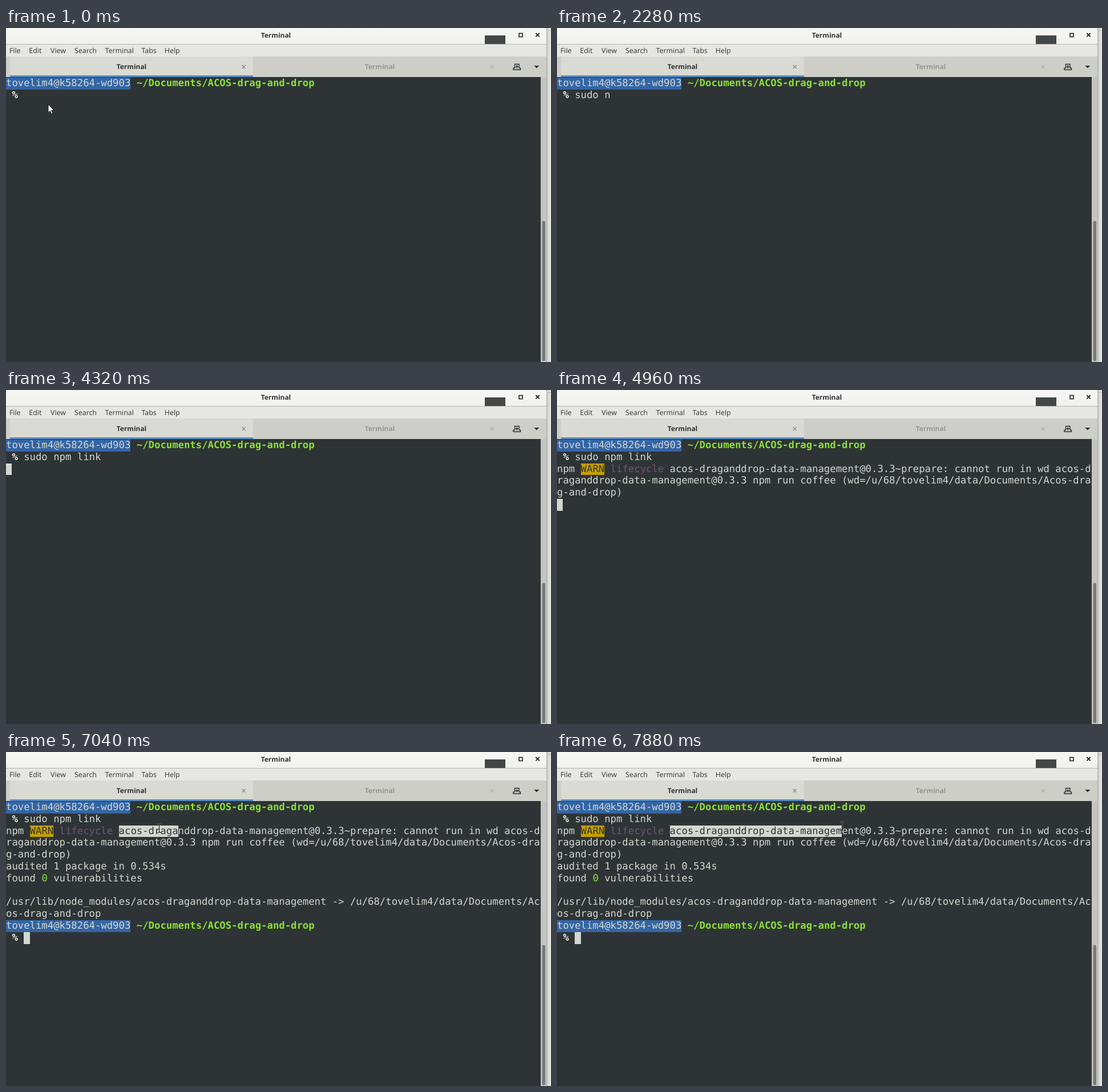
An HTML page for the animation above (8 s loop, 955x586 px).

```html
<!DOCTYPE html>
<html lang="en">
<head>
<meta charset="utf-8">
<title>Terminal</title>
<style>
  html, body { margin: 0; width: 100%; height: 100%; overflow: hidden; background: #e9e9e6; }
  #stage { position: relative; width: 955px; height: 586px; overflow: hidden; text-rendering: geometricPrecision; }
  svg { position: absolute; left: 0; top: 0; }
  svg text { font: 12.4px "Open Sans", "Noto Sans", sans-serif; fill: #2f3331; }
  svg .bold { font-weight: 700; font-size: 11.9px; text-anchor: middle; }
  #term { position: absolute; left: 0; top: 87px; font: 17.274px/21px "DejaVu Sans Mono", monospace; }
  #term span { position: absolute; height: 20.8px; white-space: pre; }
</style>
</head>
<body>
<div id="stage">
  <svg width="955" height="586">
    <defs>
      <linearGradient id="bar" x2="0" y2="1">
        <stop offset="0" stop-color="#f6f6f3"/>
        <stop offset="1" stop-color="#f1f1ec"/>
      </linearGradient>
      <linearGradient id="shade">
        <stop offset="0" stop-color="#c9c9c6"/>
        <stop offset="1" stop-color="#e9e9e6"/>
      </linearGradient>
    </defs>
    <!-- desktop edge and window -->
    <rect x="947" width="8" height="586" fill="url(#shade)"/>
    <rect x="949" y="4" width="6" height="1" fill="#b9b9b5"/>
    <rect x="947" width="1" height="586" fill="#a5a6a2"/>
    <rect width="947" height="28" fill="url(#bar)"/>
    <rect y="28" width="947" height="1" fill="#b5b6af"/>
    <rect y="29" width="947" height="21" fill="#e6e7e2"/>
    <rect y="50" width="947" height="36" fill="#cdcec8"/>
    <rect x="7" y="50" width="426" height="36" fill="#d9dad4"/>
    <rect x="7" y="83.2" width="426" height="2.6" fill="#4a86cb"/>
    <rect y="86" width="937" height="500" fill="#2e3436"/>
    <rect x="937" y="86" width="10" height="500" fill="#c3c5c2"/>
    <rect x="939.5" y="338.5" width="5.5" height="246" rx="2.7" fill="#777a79"/>
    <!-- title bar -->
    <text class="bold" x="473" y="17.3">Terminal</text>
    <rect x="839" y="13" width="36" height="15" fill="#434745"/>
    <rect x="899" y="9.5" width="6" height="6" fill="none" stroke="#2b2f2d" stroke-width="1.7"/>
    <path d="M928.3 9l6.4 6.4m0-6.4l-6.4 6.4" stroke="#2b2f2d" stroke-width="2"/>
    <!-- menu -->
    <text x="5.9" y="44.3">File</text>
    <text x="40.3" y="44.3">Edit</text>
    <text x="78" y="44.3">View</text>
    <text x="120" y="44.3">Search</text>
    <text x="173.5" y="44.3">Terminal</text>
    <text x="237.5" y="44.3">Tabs</text>
    <text x="277.8" y="44.3">Help</text>
    <!-- tabs -->
    <text class="bold" x="220" y="72.2">Terminal</text>
    <text class="bold" x="655" y="72.2" style="fill:#969792">Terminal</text>
    <path d="M413.7 65l6 6m0-6l-6 6" stroke="#8c8e89" stroke-width="1.5"/>
    <path d="M849 65l6 6m0-6l-6 6" stroke="#b3b4ae" stroke-width="1.5"/>
    <path d="M891.5 70.5V63.5h7.5v7M889 73.3h12.5v-3h-2.5M889 73.8v-3.5h2.5M895.3 65.3v5.4M892.6 68h5.4"
      fill="none" stroke="#2b2f2d" stroke-width="1.4"/>
    <path d="M925.3 66h9l-4.5 4.5z" fill="#2b2f2d"/>
  </svg>
  <div id="term"></div>
  <svg width="955" height="586">
    <path id="arrow" d="M0 0V14.5L3.4 11.4 5.8 16.8 8 15.8 5.7 10.5H10Z" fill="#fff" stroke="#111" stroke-width=".9"/>
    <g id="beam" fill="none">
      <path id="outline" stroke="#fff" stroke-opacity=".5" stroke-width="2.1"
        d="M-3.5-7.7Q-.6-7.7 0-6.3Q.6-7.7 3.5-7.7M0-6.3V6.3M-3.5 7.7Q-.6 7.7 0 6.3Q.6 7.7 3.5 7.7"/>
    </g>
  </svg>
</div>
<script>
const LOOP = 8000, CELL = 10.4, LINE = 20.8;
const BG = '#2e3436', FG = '#d3d7cf', GREEN = '#8ae234';
const USER = 'tovelim4', HOST = 'k58264-wd903';
const $ = id => document.getElementById(id);
const term = $('term');

// A run is [text, colour, background, bold].
const prompt = [[`${USER}@${HOST}`, FG, '#3465a4'], [' '], ['~/Documents/ACOS-drag-and-drop', GREEN, '', true]];
const percent = [[' % ', '#eeeeec', '', true]];
const home = `/u/68/${USER}/data/Documents/`;
const PKG = 'acos-draganddrop-data-management';

// Time, row, runs
const output = [
  [0, 0, prompt],
  [0, 1, percent],
  [4920, 2, [['npm '], ['WARN', BG, '#c4a000'], [' '], ['lifecycle', '#75507b'],
    [` ${PKG}@0.3.3~prepare: cannot run in wd acos-d`]]],
  [4920, 3, [[`raganddrop-data-management@0.3.3 npm run coffee (wd=${home}Acos-dra`]]],
  [4920, 4, [['g-and-drop)']]],
  [5360, 5, [['audited 1 package in 0.534s']]],
  [5360, 6, [['found '], ['0', GREEN], [' vulnerabilities']]],
  [5440, 8, [[`/usr/lib/node_modules/${PKG} -> ${home}Ac`]]],
  [5440, 9, [['os-drag-and-drop']]],
  [5520, 10, prompt],
  [5520, 11, percent]
];

const command = 'sudo npm link';
const keyTimes = [520, 680, 840, 1120, 1360, 1720, 2400, 2560, 2800, 3080, 3160, 3360, 3560];

// Time, row, column once the command has been entered
const cursorStops = [[4320, 2, 0], [4920, 5, 0], [5360, 8, 0], [5440, 10, 0], [5520, 11, 3]];
const blinkOff = [[0, 80], [2280, 2320], [4080, 4280], [4840, 4920], [6040, 6600], [7160, 7680]];

// Time, x, y
const beamPath = [
  [5720, 244, 178], [5960, 248.5, 169], [6440, 202, 137.5], [6600, 202, 137.5],
  [7040, 268.5, 134], [7200, 314, 128.5], [7360, 314, 128.5], [7880, 499.5, 130]
];
const SEL_ROW = 2, SEL_COL = 19, SEL_LEAD = 110;

const within = (t, [from, to]) => t >= from && t < to;

function beamAt(t) {
  let i = beamPath.findIndex(k => k[0] > t);
  if (i < 0) return beamPath.at(-1).slice(1);
  i = Math.max(i, 1);
  const [t0, x0, y0] = beamPath[i - 1], [t1, x1, y1] = beamPath[i];
  const p = Math.max(0, (t - t0) / (t1 - t0));
  return [x0 + (x1 - x0) * p, y0 + (y1 - y0) * p];
}

function selectionAt(t) {
  if (t < 6640) return [0, 0];
  // Above the first selected line the range runs backwards
  if (within(t, [7160, 7400])) return [0, SEL_COL];
  const x = beamAt(t + SEL_LEAD)[0];
  return [SEL_COL, Math.max(SEL_COL, Math.round(x / CELL))];
}

function cursorAt(t, typed) {
  if (blinkOff.some(span => within(t, span))) return null;
  const stop = cursorStops.findLast(s => s[0] <= t);
  return stop ? stop.slice(1) : [1, 3 + typed];
}

function put(row, col, text, color = FG, back = '', bold = false) {
  const el = document.createElement('span');
  el.textContent = text;
  el.style.cssText = `left:${col * CELL}px;top:${row * LINE}px;width:${text.length * CELL}px;` +
    `color:${color};background:${back || 'none'};font-weight:${bold ? 700 : 400}`;
  term.append(el);
}

function putRow(row, runs, [from, to]) {
  let col = 0;
  for (const [text, color = FG, back = '', bold] of runs) {
    const start = col, end = col + text.length;
    const a = Math.min(Math.max(from, start), end), b = Math.min(Math.max(to, a), end);
    const part = (s, e, ...look) => s < e && put(row, s, text.slice(s - start, e - start), ...look, bold);
    part(start, a, color, back);
    part(a, b, back || BG, color);
    part(b, end, color, back);
    col = end;
  }
}

let shown = '';
function drawTerminal(t) {
  const lines = output.filter(line => line[0] <= t);
  const typed = keyTimes.filter(k => k <= t).length;
  const cursor = cursorAt(t, typed), sel = selectionAt(t);
  const state = [lines.length, typed, cursor, sel].join('|');
  if (state === shown) return;
  shown = state;
  term.replaceChildren();
  for (const [, row, runs] of lines) putRow(row, runs, row === SEL_ROW ? sel : [0, 0]);
  if (typed) put(1, 3, command.slice(0, typed));
  if (cursor) put(...cursor, ' ', BG, FG);
}

function place(el, visible, x, y) {
  el.style.display = visible ? '' : 'none';
  el.setAttribute('transform', `translate(${x} ${y})`);
}

function drawPointer(t) {
  place($('arrow'), t < 80, 74, 134);
  const early = within(t, [80, 520]);
  const [x, y] = early ? [74.5, 135] : beamAt(t);
  place($('beam'), early || t >= beamPath[0][0], x, y);
}

// Dark core on top of the light outline
const core = $('outline').cloneNode();
core.id = 'core';
core.setAttribute('stroke', '#111');
core.setAttribute('stroke-opacity', 1);
core.setAttribute('stroke-width', 1.1);
$('beam').append(core);

const start = performance.now();
function tick() {
  const elapsed = Math.max(0, performance.now() - start) % LOOP;
  const t = Math.floor(elapsed / 40) * 40;
  drawTerminal(t);
  drawPointer(t);
  requestAnimationFrame(tick);
}
tick();
</script>
</body>
</html>
```
